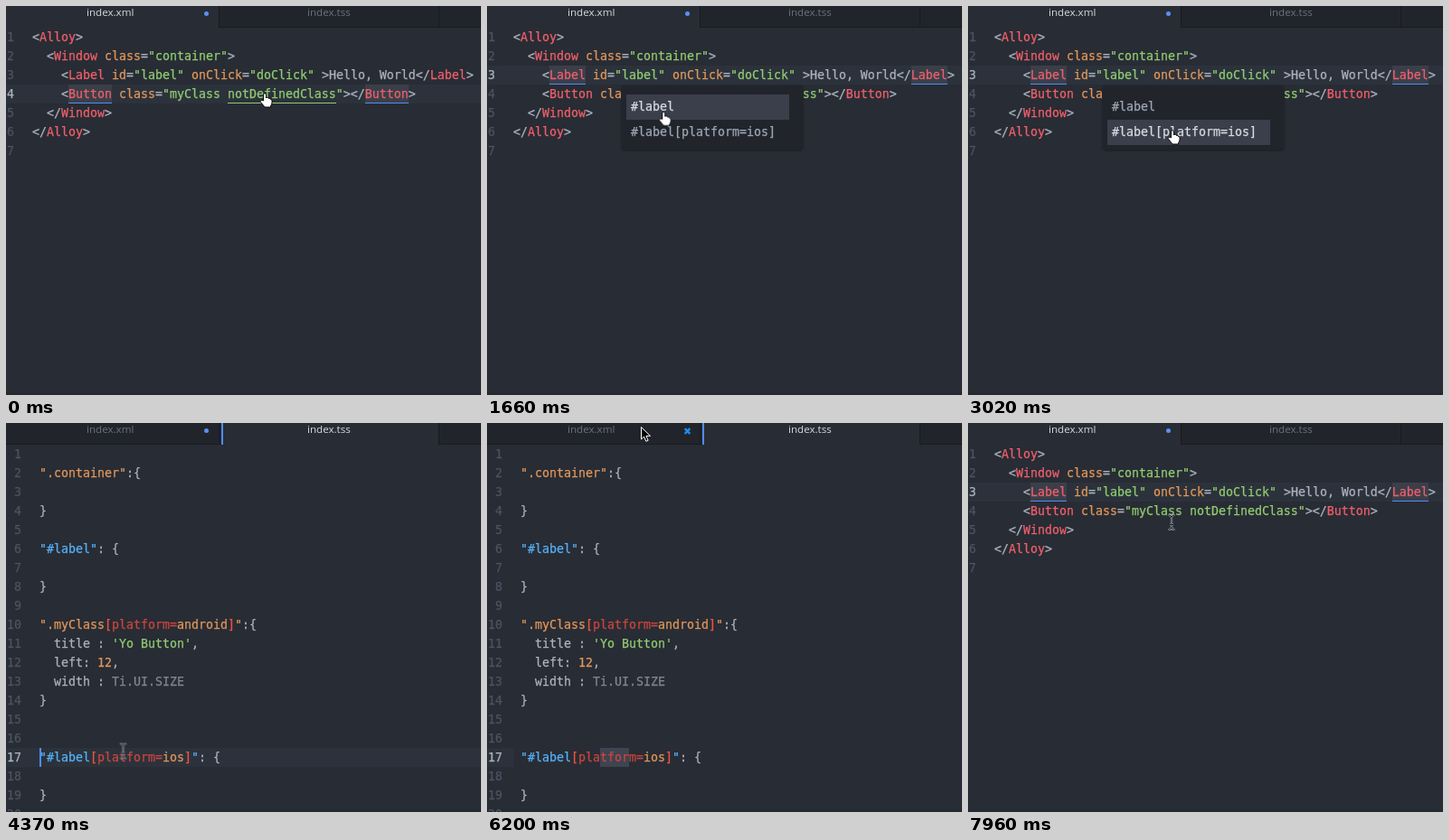
Write an HTML page that moves like this. It is 525 px wide and 431 px high and loops after 8000 ms.

```html
<!DOCTYPE html>
<html lang="en">
<head>
<meta charset="utf-8">
<title>Editor: jump to style definition</title>
<style>
  :root {
    --bg: #282c34; --dark: #21252b; --edge: #181a1f; --line: #2c323b;
    --text: #abb2bf; --dim: #4b5362; --caret: #528bff;
    --red: #ef5f6b; --orange: #e0965a; --green: #90cc72; --blue: #56b0f5;
  }
  html, body { margin: 0; width: 100%; height: 100%; overflow: hidden; background: var(--bg); }
  #stage {
    position: relative; width: 525px; height: 431px; overflow: hidden;
    background: linear-gradient(var(--bg) 428px, #24282f 428px);
    font: 13.29px/21px "DejaVu Sans Mono", monospace;
    -webkit-text-stroke: .25px;
  }
  section, .box { position: absolute; }
  section { inset: 0; }

  /* every timed part runs on the same 8 s clock */
  .anim { animation: 8s step-end infinite; }

  /* tabs */
  header {
    position: absolute; inset: 0 0 auto; height: 23px; background: var(--dark);
    border-bottom: 1px solid var(--edge);
    font: 11.6px/16px "Open Sans", sans-serif; -webkit-text-stroke: 0;
  }
  .tab { position: absolute; top: 0; height: 23px; box-sizing: border-box; color: #6b717d; }
  .tab span { position: absolute; top: -1px; }
  .first { left: 0; width: 236px; border-right: 1px solid var(--edge); }
  .first span { left: 89px; }
  .second { left: 238px; width: 241px; border-right: 1px solid var(--edge); }
  .second span { left: 95px; }
  .tab.open { height: 24px; background: var(--bg); color: #d7dae0; }
  .second.open { box-shadow: inset 2px 0 var(--caret); }
  .dot { position: absolute; left: 219px; top: 6px; width: 5px; height: 5px; border-radius: 50%; background: #5a90f2; }
  .cross { position: absolute; left: 217px; top: 5px; width: 9px; height: 8px; background: var(--dark); }
  .open .cross { background: var(--bg); }
  .cross path { stroke: #1e8cf5; stroke-width: 2.4; }

  /* code */
  .code { position: absolute; top: 24px; left: 0; right: 0; padding-left: var(--pad); }
  p { position: relative; margin: 0; height: 21px; white-space: pre; color: var(--dim); counter-increment: row; }
  p::before { content: counter(row); position: absolute; right: calc(100% + 20px); }
  code { font: inherit; color: var(--text); }
  #xml { --pad: 29px; }
  #tss { --pad: 37px; }
  .t { color: var(--red); }
  .a { color: var(--orange); }
  .s { color: var(--green); }
  .i { color: var(--blue); }
  .b { color: #f0523f; }
  .k { color: #c9463f; }
  .g { color: #7f8794; }

  .active { position: absolute; left: 0; width: 525px; height: 21px; background: var(--line); }
  .active .box { top: 0; height: 20px; background: #3a3f49; border-bottom: 1px solid var(--caret); }
  .caret { position: absolute; width: 2px; height: 21px; background: var(--caret); }
  .link { position: absolute; left: 245px; top: 107px; width: 120px; height: 1px; background: var(--green); }

  /* suggestion list */
  .popup {
    position: absolute; left: 149px; top: 88px; width: 200px; height: 71px;
    background: var(--dark); border-radius: 4px; box-shadow: 0 1px 3px #0006;
  }
  .pick { left: 5px; top: 10px; width: 180px; height: 28px; background: #3a3f4b; }
  .item { position: absolute; left: 10px; line-height: 28px; color: #9da5b4; white-space: pre; }

  #pointer { position: absolute; left: 0; top: 0; animation: move 8s linear infinite; }
  #pointer svg { position: absolute; width: 1px; height: 1px; overflow: visible; }

  #xml { animation-name: xml; }
  #tss { animation-name: tss; }
  .row3 { top: 66px; animation-name: late; }
  .row4 { top: 87px; animation-name: early; }
  .num3 { animation-name: light; }
  .num4 { animation-name: fade; }
  .num17 { color: var(--text); }
  .row17 { top: 360px; animation-name: shrink; }
  .link { animation-name: hand-link; }
  .popup { animation-name: popup; }
  .pick { animation-name: pick; }
  .item1 { top: 10px; animation-name: item1; }
  .item2 { top: 38px; animation-name: item2; }
  .caret3 { left: 173px; top: 66px; animation-name: caret3; }
  .caret17 { left: 37px; top: 360px; animation-name: caret17; }
  .select { left: 125px; top: 360px; height: 21px; background: #3e4451; animation-name: select; }
  .cross { animation-name: arrow; }
  .hand { animation-name: hand; }
  .beam { animation-name: beam; }
  .arrow { animation-name: arrow; }

  @keyframes xml { 0%, 81.25% { visibility: visible } 43.375% { visibility: hidden } }
  @keyframes tss { 0%, 81.25% { visibility: hidden } 43.375% { visibility: visible } }
  @keyframes early { 0% { opacity: 1 } 10.875%, 100% { opacity: 0 } }
  @keyframes late { 0% { opacity: 0 } 10.875%, 100% { opacity: 1 } }
  @keyframes light { 0% { color: var(--dim) } 10.875%, 100% { color: var(--text) } }
  @keyframes fade { 0% { color: var(--text) } 10.875%, 100% { color: var(--dim) } }
  @keyframes shrink { 0% { width: 525px } 64.1%, 100% { width: 30px } }
  @keyframes popup { 0%, 42.625%, 100% { opacity: 0 } 11.75% { opacity: 1 } }
  @keyframes pick {
    0%, 27.7% { transform: none }
    21.7%, 29.5%, 100% { transform: translateY(28px) }
  }
  @keyframes item1 { 0%, 27.7% { color: #d7dae0 } 21.7%, 29.5%, 100% { color: #9da5b4 } }
  @keyframes item2 { 0%, 27.7% { color: #9da5b4 } 21.7%, 29.5%, 100% { color: #d7dae0 } }
  @keyframes caret3 {
    0%, 17.6%, 27.6%, 37.6%, 86.1%, 96%, 100% { opacity: 0 }
    10.875%, 22.6%, 32.6%, 42.6%, 81.25%, 91% { opacity: 1 }
  }
  @keyframes caret17 { 0%, 53.1% { opacity: 1 } 48.1%, 58.1%, 100% { opacity: 0 } }
  @keyframes select {
    0% { width: 0 } 64.1% { width: 8px } 64.7% { width: 16px }
    65.3% { width: 24px } 65.9%, 100% { width: 32px }
  }
  @keyframes hand-link { 0%, 91.4% { opacity: 1 } 2.875%, 95.6%, 100% { opacity: 0 } }
  @keyframes hand { 0%, 19.25%, 91.4% { opacity: 1 } 2.875%, 43.375%, 95.6%, 100% { opacity: 0 } }
  @keyframes arrow { 0%, 83.7%, 100% { opacity: 0 } 76.2% { opacity: 1 } }
  @keyframes beam {
    0%, 19.25%, 76.2%, 91.4% { opacity: 0 }
    2.875%, 43.375%, 83.7%, 95.6%, 100% { opacity: 1 }
  }
  @keyframes move {
    0%, 1.875% { transform: translate(286px, 97px) }
    3.375% { transform: translate(236px, 107px) }
    7.125%, 8.7% { transform: translate(154px, 77px) }
    10.6% { transform: translate(172px, 74px) }
    15.2% { transform: translate(172px, 74px); animation-timing-function: ease-in-out }
    25.375%, 26.1% { transform: translate(212px, 149px) }
    28.3%, 29.1% { transform: translate(212px, 115px) }
    30.5%, 34.5% { transform: translate(215px, 153px) }
    37.75% { transform: translate(226px, 138px) }
    42.6% { transform: translate(226px, 138px); animation-timing-function: ease-in-out }
    52.4% { transform: translate(229px, 363px) }
    54.6%, 55.2% { transform: translate(129.5px, 363.5px) }
    59.4%, 61.9% { transform: translate(77px, 365px) }
    63.75% { transform: translate(127px, 367px) }
    66.1% { transform: translate(161px, 379px) }
    68.4% { transform: translate(161px, 379px); animation-timing-function: ease-in-out }
    77.5% { transform: translate(170px, 4px) }
    80.9% { transform: translate(170px, 4px); animation-timing-function: ease-in-out }
    91% { transform: translate(258px, 116px) }
    91.6%, 94.6% { transform: translate(256px, 100px) }
    98.5%, 100% { transform: translate(225px, 110px) }
  }
</style>
</head>
<body>
<div id="stage">

  <section id="xml" class="anim">
    <header>
      <div class="tab first open"><span>index.xml</span><i class="dot"></i>
        <svg class="cross anim" viewBox="0 0 9 8"><path d="M1.7 1.2l5.6 5.6m0-5.6L1.7 6.8"/></svg></div>
      <div class="tab second"><span>index.tss</span></div>
    </header>
    <div class="active row3 anim">
      <div class="box" style="left:69px;width:40px"></div>
      <div class="box" style="left:469px;width:40px"></div>
    </div>
    <div class="active row4 anim">
      <div class="box" style="left:69px;width:48px"></div>
      <div class="box" style="left:397px;width:48px"></div>
    </div>
    <div class="code">
      <p><code>&lt;<span class="t">Alloy</span>&gt;</code></p>
      <p><code>  &lt;<span class="t">Window</span> <span class="a">class</span>=<span class="s">"container"</span>&gt;</code></p>
      <p class="num3 anim"><code>    &lt;<span class="t">Label</span> <span class="a">id</span>=<span class="s">"label"</span> <span class="a">onClick</span>=<span class="s">"doClick"</span> &gt;Hello, World&lt;/<span class="t">Label</span>&gt;</code></p>
      <p class="num4 anim"><code>    &lt;<span class="t">Button</span> <span class="a">class</span>=<span class="s">"myClass notDefinedClass"</span>&gt;&lt;/<span class="t">Button</span>&gt;</code></p>
      <p><code>  &lt;/<span class="t">Window</span>&gt;</code></p>
      <p><code>&lt;/<span class="t">Alloy</span>&gt;</code></p>
      <p></p>
    </div>
    <div class="link anim"></div>
    <div class="caret caret3 anim"></div>
    <div class="popup anim">
      <div class="box pick anim"></div>
      <div class="item item1 anim">#label</div>
      <div class="item item2 anim">#label[platform=ios]</div>
    </div>
  </section>

  <section id="tss" class="anim">
    <header>
      <div class="tab first"><span>index.xml</span><i class="dot"></i>
        <svg class="cross anim" viewBox="0 0 9 8"><path d="M1.7 1.2l5.6 5.6m0-5.6L1.7 6.8"/></svg></div>
      <div class="tab second open"><span>index.tss</span></div>
    </header>
    <div class="active row17 anim"></div>
    <div class="box select anim"></div>
    <div class="code">
      <p></p>
      <p><code><span class="a">".container"</span>:{</code></p>
      <p></p>
      <p><code>}</code></p>
      <p></p>
      <p><code><span class="i">"#label"</span>: {</code></p>
      <p></p>
      <p><code>}</code></p>
      <p></p>
      <p><code><span class="a">".myClass<span class="b">[</span><span class="k">platform=</span>android<span class="b">]</span>"</span>:{</code></p>
      <p><code>  title : <span class="s">'Yo Button'</span>,</code></p>
      <p><code>  left: <span class="a">12</span>,</code></p>
      <p><code>  width : <span class="g">Ti.UI.SIZE</span></code></p>
      <p><code>}</code></p>
      <p></p>
      <p></p>
      <p class="num17"><code><span class="i">"#label<span class="b">[</span><span class="k">platform=</span><span class="a">ios</span><span class="b">]</span>"</span>: {</code></p>
      <p></p>
      <p><code>}</code></p>
      <p></p>
    </div>
    <div class="caret caret17 anim"></div>
  </section>

  <div id="pointer">
    <svg class="hand anim"><path fill="#fff" stroke="#000" stroke-width=".9" d="M-1.5 8V1.2a1.5 1.5 0 0 1 3 0V5l.3-.6q2.2-.6 2.4 1q2-.4 2.2 1.2q1.6-.2 1.6 1.4V10q-.2 2.4-1.5 3.5V15H0Q-1.8 12.5-4.5 9.5q-.8-1.5.4-2t2.6.5z"/></svg>
    <svg class="beam anim" fill="none">
      <path id="bar" stroke="#b4b8c0" stroke-width="2.2" d="M-3.5-8Q0-8 0-5.5Q0-8 3.5-8M0-5.5V5.5M-3.5 8Q0 8 0 5.5Q0 8 3.5 8M-2 2.5H2"/>
      <use href="#bar" style="filter:brightness(.15)" transform="scale(.98)" opacity="0"/>
      <path stroke="#1d2026" d="M-3.5-8Q0-8 0-5.5Q0-8 3.5-8M0-5.5V5.5M-3.5 8Q0 8 0 5.5Q0 8 3.5 8M-2 2.5H2"/>
    </svg>
    <svg class="arrow anim"><path fill="#000" stroke="#fff" d="M.5.5V14l3.1-2.9 2.2 5.2 2.3-1-2.2-5H10.5z"/></svg>
  </div>

</div>
</body>
</html>
```
